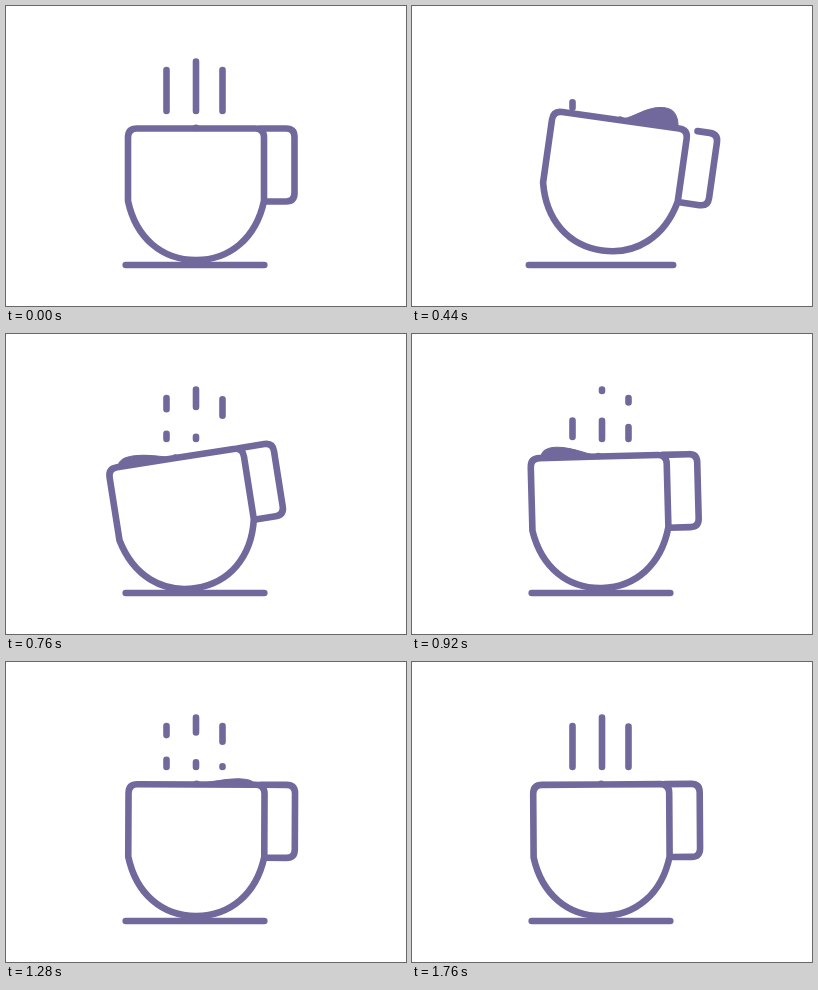
An HTML page for the animation above (2600 ms loop, 400 by 300 pixels).

```html
<!DOCTYPE html>
<html lang="en">
<head>
<meta charset="utf-8">
<title>Coffee cup</title>
<style>
html, body { margin: 0; width: 100%; height: 100%; overflow: hidden; background: #fff; }
svg { display: block; width: 100vw; height: 100vh; }
path { fill: none; stroke: #71699c; stroke-width: 6.6; stroke-linecap: round; stroke-linejoin: round; }
#wave { fill: #71699c; stroke-width: 1; }
</style>
</head>
<body>
<svg viewBox="0 0 400 300">
  <path id="steam"/>
  <path id="base"/>
  <g id="cup">
    <path id="handle" pathLength="1" d="M258 195.5H280Q288.5 195.5 288.5 187V131Q288.5 122.5 280 122.5H254"/>
    <path id="wave"/>
    <path id="body" pathLength="1" style="fill:#fff" d="M190 122.5H249Q258 122.5 258 131.5V195C250 232 224 254 190 254C156 254 130 232 122 195V131.5Q122 122.5 131 122.5Z"/>
    <path id="joint" d="M190 121.9v.1"/>
  </g>
</svg>
<script>
const LOOP = 2600, STEP = 40, LAST = 1760, REST = 9999;
const el = id => document.getElementById(id);
const clamp = (v, lo, hi) => Math.min(hi, Math.max(lo, v));

// Smooth interpolation through [time, value] keys
function track(t, keys) {
  let [t0, v0] = keys[0];
  for (const [t1, v1] of keys) {
    if (t < t1) {
      const p = clamp((t - t0) / (t1 - t0), 0, 1);
      return v0 + (v1 - v0) * p * p * (3 - 2 * p);
    }
    t0 = t1;
    v0 = v1;
  }
  return v0;
}

function trim(id, amount) {
  el(id).style.display = amount > 0 ? "" : "none";
  el(id).style.strokeDasharray = amount < 1 ? `${amount} 2` : "none";
}

// A dash climbs the line, wraps around, and finally fills it
function steam(t, x, height, delay) {
  const u = t - 400 - delay;
  if (u <= 0) return "";
  const tail = Math.min(u * 0.00202, 2);
  const head = Math.min(u * 0.00202 + 0.4 * Math.min(u / 120, 1), 3);
  let d = "";
  for (let k = 0; k < 3; k++) {
    const a = Math.max(tail, k) - k, b = Math.min(head, k + 1) - k;
    if (b > a) d += `M${x} ${105 - height * a}V${105 - height * b}`;
  }
  return d;
}

function wavePath(h) {
  const side = h < 0 ? -1 : 1, top = 122 - Math.abs(h), mid = 122 - Math.abs(h) / 2;
  const x = dx => 190 + side * dx;
  return `M190 122C${x(15)} ${122 - Math.abs(h) * 0.3} ${x(25)} ${top} ${x(42)} ${top}` +
    `C${x(53)} ${top} ${x(57)} ${mid} ${x(58)} 122Z`;
}

function draw(t) {
  const angle = track(t, [[40, 0], [375, 10.3], [685, -9.4], [720, -9.4], [1110, 5.8], [1420, -3.9], [1840, 0]]);
  const lift = track(t, [[40, 0], [380, 14], [540, 0]]);
  el("cup").setAttribute("transform", `translate(0 ${-lift}) rotate(${angle} 190 255)`);

  trim("body", track(t, [[40, 0], [400, 1]]));
  trim("handle", track(t, [[160, 0], [510, 1]]));
  el("joint").style.display = t > 400 ? "" : "none";

  const wave = track(t, [[240, 0], [430, 18], [860, -12.5], [1140, 10], [1440, 0]]);
  el("wave").setAttribute("d", Math.abs(wave) > 0.1 ? wavePath(wave) : "");

  const half = 69.3 * track(t, [[40, 0], [300, 1.19], [500, 1]]);
  el("base").setAttribute("d", half ? `M${189 - half} 259H${189 + half}` : "");

  el("steam").setAttribute("d",
    steam(t, 160.5, 41, 0) + steam(t, 190, 49.5, 40) + steam(t, 216.5, 41, 80));
}

const start = performance.now();
function frame() {
  const t = (performance.now() - start) % LOOP;
  draw(t < STEP ? REST : Math.min(Math.floor(t / STEP) * STEP, LAST));
  requestAnimationFrame(frame);
}
frame();
</script>
</body>
</html>
```
